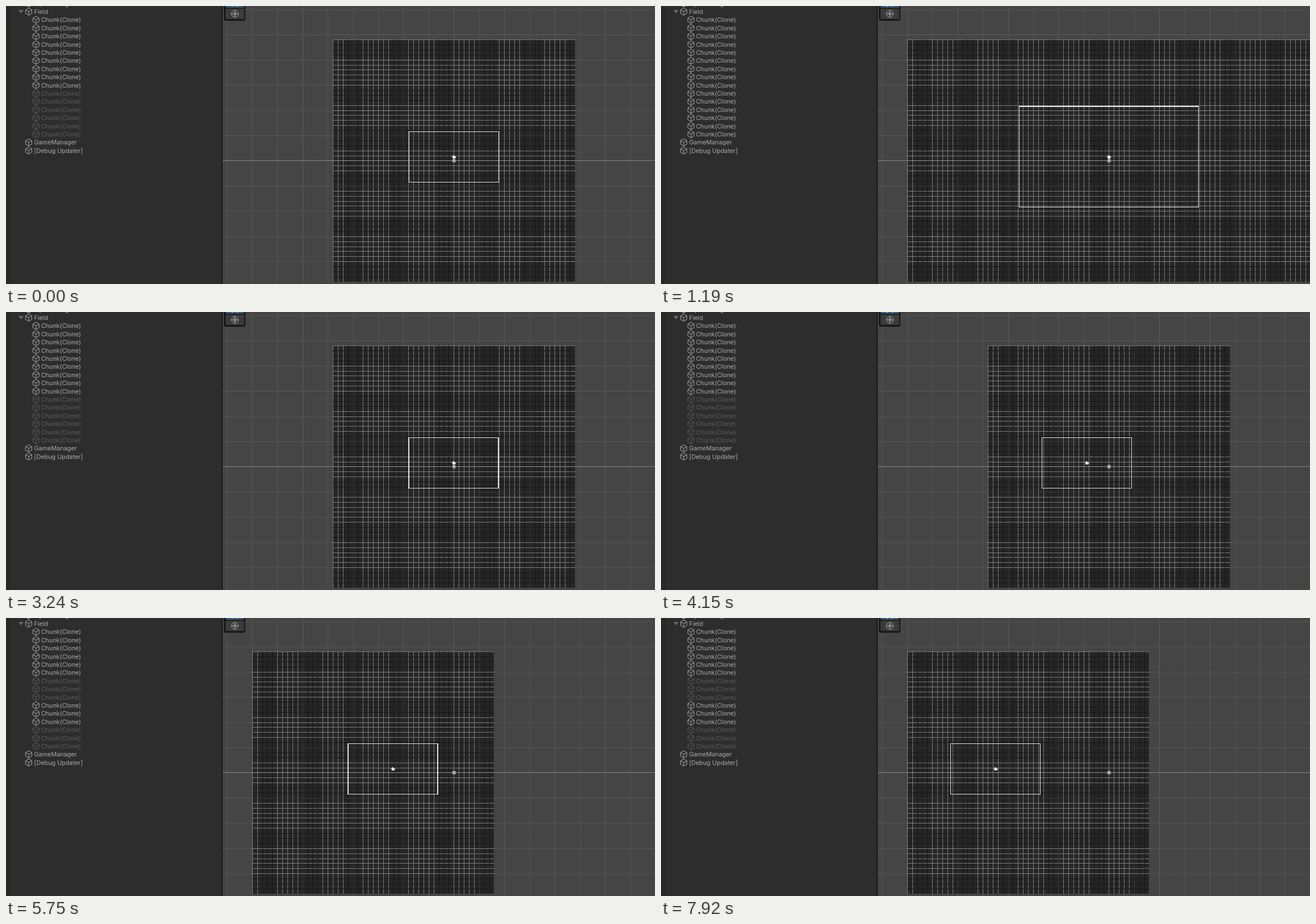
Write an HTML page with a canvas that moves like this. It is 1144 px wide and 490 px high and loops after 7990 ms.

```html
<!DOCTYPE html>
<html lang="en">
<head>
<meta charset="utf-8">
<title>Chunk streaming</title>
<style>
  html, body { margin: 0; width: 100%; height: 100%; overflow: hidden; background: #2d2d2d; }
  canvas { position: absolute; left: 0; top: 0; }
  .row {
    position: absolute; white-space: pre; color: #a9a9a9;
    font: 10.9px/14px Inter, "Open Sans", sans-serif; letter-spacing: -0.04px;
  }
  .off { color: #5c5c5c; }
</style>
</head>
<body>
<canvas id="stage" width="1144" height="490"></canvas>
<script>
const LOOP = 7990;
const CELL = 80 / 9, CHUNK = 16 * CELL;
const ORIGIN = { x: 789.86, y: 272.9 };
const FIELD = { x: 434.3, y: 59.57, rows: 48 };
const VIEW = { x: 789.4, y: 265.83, w: 79.01, h: 44.44 };
const ROW = 14.4;
const WALK = { start: 3240, step: 69.85, dx: 2.978 };

const ctx = document.getElementById('stage').getContext('2d');

// [time, zoom]
const zooms = [
  [0, 1], [790, 1.4], [990, 1.6], [1060, 2], [1720, 1.8],
  [1790, 1.6], [2180, 1.4], [2280, 1.2], [2380, 1]
];

function addRow(text, x, y) {
  const el = document.createElement('div');
  el.className = 'row';
  el.textContent = text;
  el.style.left = x + 'px';
  el.style.top = y - 6.7 + 'px';
  document.body.append(el);
  return el;
}

const rowY = i => 9.6 + ROW * i;
addRow('InputManager', 49.5, rowY(-1));
addRow('Field', 49.5, rowY(0));
const chunkRows = Array.from({ length: 15 }, (_, i) => addRow('Chunk(Clone)', 61.7, rowY(i + 1)));
addRow('GameManager', 49.5, rowY(16));
addRow('[Debug Updater]', 49.5, rowY(17));

function box(x, y, w, h, color) {
  ctx.fillStyle = color;
  ctx.fillRect(x, y, w, h);
}

function poly(points, color) {
  ctx.fillStyle = color;
  ctx.beginPath();
  points.forEach(([x, y]) => ctx.lineTo(x, y));
  ctx.fill();
}

function rounded(x, y, w, h, r, color) {
  ctx.fillStyle = color;
  ctx.beginPath();
  ctx.roundRect(x, y, w, h, r);
  ctx.fill();
}

function cube(x, y, color) {
  ctx.strokeStyle = color;
  ctx.lineWidth = 1;
  ctx.beginPath();
  for (let i = 0; i < 6; i++) {
    const a = Math.PI * (i / 3 + 1 / 6);
    ctx.lineTo(x + 6.3 * Math.cos(a), y + 6.3 * Math.sin(a));
  }
  ctx.closePath();
  ctx.moveTo(x - 5.4, y - 3.1);
  ctx.lineTo(x, y);
  ctx.lineTo(x + 5.4, y - 3.1);
  ctx.moveTo(x, y);
  ctx.lineTo(x, y + 6.3);
  ctx.stroke();
}

function gridLines(x, y, w, h, even, odd) {
  const step = 5 * CELL;
  for (let i = -9; i <= 7; i++) {
    const px = Math.floor(ORIGIN.x + i * step);
    if (px >= x && px < x + w) box(px, y, 1, h, i % 2 ? odd : even);
  }
  for (let i = -6; i <= 4; i++) {
    const py = Math.floor(ORIGIN.y + i * step);
    if (py >= y && py < y + h) box(x, py, w, 1, i % 2 ? even : odd);
  }
}

function drawSceneGrid() {
  box(382, 0, 762, 490, '#454545');
  gridLines(382, 0, 762, 490, '#595959', '#545454');
  box(382, 272, 762, 1, '#858585');
}

// Tile outlines only survive sampling in a repeating band of cells
function isLight(k) {
  const period = 8.79;
  return ((k + 4.45) % period + period) % period < 5.47;
}

function drawField(first, last) {
  const from = first * 16, to = last * 16;
  const left = Math.floor(FIELD.x + from * CELL);
  const right = Math.floor(FIELD.x + to * CELL);
  const top = Math.floor(FIELD.y);
  const w = right - left, h = Math.floor(FIELD.y + FIELD.rows * CELL) - top;
  box(left, top, w, h, '#252525');
  for (const light of [true, false]) {
    const color = light ? '#7e7e7e' : '#171717';
    for (let k = from; k < to; k++) {
      if (isLight(k) === light) box(Math.floor(FIELD.x + k * CELL), top, 1, h, color);
    }
    for (let j = 0; j < FIELD.rows; j++) {
      if (isLight(j - 8) === light) box(left, Math.floor(FIELD.y + j * CELL), w, 1, color);
    }
  }
  const veil = 'rgba(150, 150, 150, 0.25)';
  gridLines(left, top, w, h, veil, veil);
  box(left, 272, w, 1, '#939393');
}

// A hairline lights two pixels when it falls between them
function hairline(v) {
  const a = Math.floor(v - 0.18);
  return [a, Math.floor(v + 0.18) - a + 1];
}

function drawView(cx, zoom) {
  const w = VIEW.w * zoom, h = VIEW.h * zoom;
  const left = Math.floor(cx - w), top = Math.floor(VIEW.y - h);
  const color = '#e4e4e4';
  for (const v of [cx - w, cx + w]) {
    const [x, size] = hairline(v);
    box(x, top, size, Math.floor(VIEW.y + h) - top + 1, color);
  }
  for (const v of [VIEW.y - h, VIEW.y + h]) {
    const [y, size] = hairline(v);
    box(left, y, Math.floor(cx + w) - left + 1, size, color);
  }
}

function drawPlayer() {
  rounded(787, 269.5, 5.5, 6, 1.5, '#bdbdbd');
  box(788.5, 271, 2.5, 1, '#6a6a6a');
  box(788.5, 273.5, 2.5, 1, '#858585');
}

function drawCamera(x) {
  const y = VIEW.y;
  poly([
    [x - 3.6, y - 0.8], [x - 1.6, y - 0.6], [x - 1.4, y - 2.8], [x + 0.6, y - 2.8],
    [x + 1.4, y - 0.8], [x + 4, y - 0.4], [x + 3.6, y + 1.4], [x + 2, y + 2.8],
    [x - 1.8, y + 2.8], [x - 2.2, y + 1]
  ], '#f0f0f0');
}

function drawToolbar() {
  rounded(384, -8, 38, 34, 4, '#171717');
  rounded(387, -8, 33, 11, 2, '#3a5675');
  box(398, 0, 2, 1, '#c8c8c8');
  box(407, 0, 2, 1, '#c8c8c8');
  rounded(387, 4.5, 33, 18.5, 2, '#3b3b3b');
  ctx.strokeStyle = '#a0a0a0';
  ctx.lineWidth = 1;
  ctx.beginPath();
  ctx.arc(403.5, 13.8, 6, 0, 7);
  ctx.moveTo(396.5, 13.8);
  ctx.lineTo(410.5, 13.8);
  ctx.moveTo(403.5, 7);
  ctx.lineTo(403.5, 20.5);
  ctx.moveTo(406, 13.8);
  ctx.arc(403.5, 13.8, 2.5, 0, 7);
  ctx.stroke();
}

function drawPanel(isOn) {
  box(0, 0, 380, 490, '#2d2d2d');
  box(0, 0, 8, 490, '#282828');
  box(380, 0, 2, 490, '#191919');
  poly([[22, 7], [31, 7], [26.5, 13]], '#686868');
  for (const i of [-1, 0, 16, 17]) cube(40, rowY(i) + 0.4, '#a9a9a9');
  chunkRows.forEach((el, i) => {
    const on = isOn(i);
    el.classList.toggle('off', !on);
    cube(52.8, rowY(i + 1) + 0.4, on ? '#a9a9a9' : '#5c5c5c');
  });
}

function stateAt(t) {
  const zoom = zooms.findLast(z => z[0] <= t)[1];
  const n = Math.floor((t - WALK.start + 6) / WALK.step);
  const walking = t >= WALK.start;
  const x = walking ? VIEW.x - 0.3 - n * WALK.dx : VIEW.x;
  const half = VIEW.w * zoom;

  // Columns that cover the view, counted from the leftmost of five
  const first = Math.max(0, 2 + Math.floor((x - half - ORIGIN.x + 0.6) / CHUNK));
  const last = Math.min(5, 3 + Math.ceil((x + half - ORIGIN.x - 0.6) / CHUNK));

  // The hierarchy refreshes slightly after the scene
  let isOn = i => i < 9;
  if (t >= 1190 && t < 1920) isOn = () => true;
  else if (walking && n >= 28) isOn = i => i < 6 || (i > 8 && i < 12);
  else if (walking && n >= 23) isOn = i => i < 12;
  return { zoom, x, first, last, isOn };
}

function draw(t) {
  const s = stateAt(t);
  drawSceneGrid();
  drawField(s.first, s.last);
  drawView(s.x, s.zoom);
  drawPlayer();
  drawCamera(s.x);
  drawToolbar();
  drawPanel(s.isOn);
}

const begin = performance.now();
function tick() {
  draw((performance.now() - begin) % LOOP);
  requestAnimationFrame(tick);
}
tick();
</script>
</body>
</html>
```
